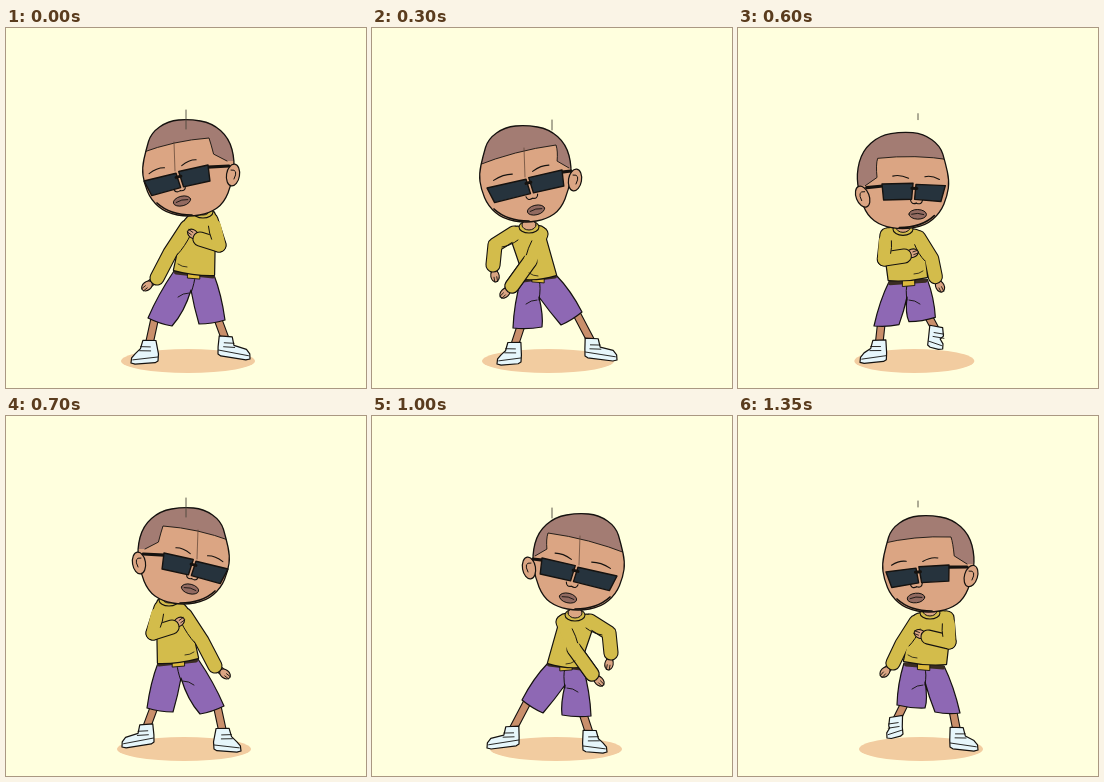
An HTML page with a canvas for the animation above (1400 ms loop, 360 by 360 pixels).

```html
<!DOCTYPE html>
<html lang="en">
<head>
<meta charset="utf-8">
<title>Dancing kid</title>
<style>
html, body { margin: 0; width: 100%; height: 100%; overflow: hidden; background: #ffffde; }
canvas { display: block; width: 360px; height: 360px; }
</style>
</head>
<body>
<canvas id="stage"></canvas>
<script>
const LOOP = 1400, SWING = 700;
const STEPS = [0, 100, 200, 250, 300, 400, 500, 550, 600, 650, 700, 800, 850, 900, 1000, 1050, 1100, 1200, 1300, 1350];
const INK = '#15120f', SKIN = '#dba583', HAIR = '#a37c73', SHIRT = '#d3bc4b', SHORTS = '#8e68b4', SHOE = '#e6f6fb', LENS = '#26333d';

// One swing, facing left; the next swing is its mirror image.
// hair: front, corner, temple. specs: left, bridge, right. arms: elbow, wrist, hand.
// torso: collar, shoulders, hem. shorts: waist, left hem, crotch, right hem. feet: ankle, heel, toe.
const POSES = [
  { at: 0, head: [213, 166], hair: [177, 147, 239, 157, 243, 180], ear: [245, 193],
    specs: [172, 165, 199, 172, 230, 181], mouth: [188, 200], tick: [103, 111], crease: [0], shadow: [185, 55],
    torso: [203, 214, 184, 216, 219, 217, 179, 262, 219, 260],
    armL: [179, 240, 187, 260, 192, 268], armR: [229, 244, 214, 248, 206, 247],
    shorts: [178, 264, 216, 262, 165, 293, 186, 301, 199, 279, 202, 303, 228, 302],
    footL: [168, 303, 177, 323, 163, 327], footR: [218, 315, 210, 334, 227, 337] },
  { at: 100, head: [205, 162], hair: [163, 138, 235, 149, 240, 177], ear: [240, 186],
    specs: [162, 161, 191, 165, 226, 170], mouth: [185, 195], tick: [87, 93], crease: [0], shadow: [185, 56],
    torso: [201, 210, 181, 213, 216, 213, 181, 257, 212, 260],
    armL: [171, 236, 178, 252, 180, 263], armR: [219, 241, 201, 242, 193, 240],
    shorts: [180, 260, 215, 261, 170, 290, 193, 297, 199, 275, 203, 298, 228, 300],
    footL: [169, 296, 181, 315, 168, 319], footR: [219, 315, 211, 333, 234, 335] },
  { at: 250, head: [191, 148], hair: [148, 126, 213, 121, 229, 148], ear: [233, 160],
    specs: [148, 156, 179, 152, 211, 149], mouth: [178, 182], tick: [85, 91], crease: [0], shadow: [183, 62],
    torso: [192, 197, 177, 202, 210, 198, 166, 245, 208, 248],
    armL: [164, 228, 155, 247, 147, 256], armR: [211, 226, 190, 221, 182, 218],
    shorts: [166, 247, 206, 250, 159, 289, 187, 292, 187, 266, 197, 296, 222, 297],
    footL: [158, 302, 165, 318, 149, 322], footR: [219, 313, 212, 331, 240, 334] },
  { at: 300, head: [183, 140], hair: [141, 123, 203, 110, 221, 133], ear: [227, 147],
    specs: [138, 153, 171, 145, 202, 137], mouth: [176, 173], tick: [82, 101], crease: [29], shadow: [182, 67],
    torso: [197, 184, 180, 195, 206, 188, 168, 242, 208, 247],
    armL: [164, 225, 151, 250, 141, 258], armR: [213, 217, 194, 211, 187, 206],
    shorts: [168, 243, 208, 247, 142, 290, 166, 298, 185, 262, 193, 296, 219, 292],
    footL: [143, 314, 152, 333, 125, 335], footR: [220, 310, 212, 326, 244, 331] },
  { at: 500, head: [171, 143], hair: [128, 126, 197, 111, 212, 134], ear: [216, 146],
    specs: [130, 155, 164, 147, 199, 137], mouth: [172, 177], tick: [82, 89], crease: [0], shadow: [181, 66],
    torso: [180, 191, 168, 200, 199, 190, 161, 243, 202, 248],
    armL: [149, 225, 142, 249, 140, 258], armR: [204, 218, 179, 224, 168, 226],
    shorts: [163, 245, 203, 248, 146, 290, 170, 299, 184, 264, 191, 296, 216, 294],
    footL: [141, 315, 149, 333, 125, 336], footR: [220, 312, 213, 327, 246, 331] },
  { at: 600, head: [154, 146], hair: [110, 136, 184, 117, 197, 140], ear: [203, 152],
    specs: [115, 160, 155, 151, 190, 142], mouth: [164, 182], tick: [92, 102], crease: [29], shadow: [176, 66],
    torso: [157, 199, 141, 201, 170, 202, 153, 251, 184, 247],
    armL: [123, 217, 121, 237, 123, 248], armR: [158, 233, 140, 258, 133, 265],
    shorts: [149, 251, 184, 247, 141, 300, 170, 299, 167, 269, 189, 297, 210, 284],
    footL: [142, 316, 149, 334, 125, 336], footR: [220, 312, 213, 328, 245, 332] },
];

// The swing ends by sinking toward the floor.
const sink = (list) => list.map((v, i) => i % 2 ? v + 9 * Math.max(0, 320 - v) / 180 : v - 2);
const last = POSES[POSES.length - 1];
const low = { at: SWING, tick: [98, 106], crease: [0], shadow: [175, 60] };
for (const key in last) if (!(key in low)) low[key] = sink(last[key]);
POSES.push(low);

const mix = (a, b, k) => a + (b - a) * k;
function poseAt(u) {
  const i = POSES.findIndex((p) => p.at > u);
  const a = POSES[i - 1], b = POSES[i], k = (u - a.at) / (b.at - a.at), out = {};
  for (const key in a) if (key !== 'at') out[key] = a[key].map((v, j) => mix(v, b[key][j], k));
  return out;
}

const canvas = document.getElementById('stage');
const g = canvas.getContext('2d');
const ratio = window.devicePixelRatio || 1;
canvas.width = canvas.height = 360 * ratio;

const pts = (list) => list.reduce((r, v, i) => (i % 2 ? r[r.length - 1].push(v) : r.push([v]), r), []);
const off = (p, x, y) => [p[0] + x, p[1] + y];
const mid = (a, b, k = 0.5) => [mix(a[0], b[0], k), mix(a[1], b[1], k)];

function poly(p, closed = true) {
  const path = new Path2D();
  p.forEach((q, i) => i ? path.lineTo(...q) : path.moveTo(...q));
  if (closed) path.closePath();
  return path;
}
function blob(p) {
  const path = new Path2D(), n = p.length;
  path.moveTo(...mid(p[n - 1], p[0]));
  p.forEach((q, i) => path.quadraticCurveTo(...q, ...mid(q, p[(i + 1) % n])));
  path.closePath();
  return path;
}
function oval(c, rx, ry, turn = 0) {
  const path = new Path2D();
  path.ellipse(...c, rx, ry, turn, 0, 7);
  return path;
}
function curve(a, c, b) {
  const path = new Path2D();
  path.moveTo(...a);
  path.quadraticCurveTo(...c, ...b);
  return path;
}
function fill(path, color) { g.fillStyle = color; g.fill(path); }
function line(path, w = 1.2, color = INK) { g.lineWidth = w; g.strokeStyle = color; g.stroke(path); }
function shape(path, color, w = 1.2) { fill(path, color); line(path, w); }
function tube(path, w, color) { line(path, w + 2.2); line(path, w, color); }

function drawShoe(list) {
  const [a, heel, toe] = pts(list);
  const dx = toe[0] - heel[0], dy = toe[1] - heel[1], len = Math.hypot(dx, dy);
  const s = Math.sign(dx), kx = dx / len, ky = dy / len;
  const at = (p, x, y) => off(p, kx * x + ky * y * s, ky * x - kx * y * s);
  const back = at(a, -7, 1), front = at(a, 6, 2);
  shape(poly([back, at(heel, -1, 7), heel, at(heel, 3, -1.5), at(toe, -4, -1.5), toe, at(toe, -1, 5),
    at(toe, -5, 9), at(front, 3, -8), front]), SHOE, 1.2);
  line(poly([at(heel, 0, 4), at(toe, -2, 3)], false), 0.9);
  for (const d of [5, 9]) line(poly([at(a, -1, -d), at(a, 7 + d / 3, -d + 1)], false), 0.9);
}

function drawHand(wrist, hand) {
  const turn = Math.atan2(hand[1] - wrist[1], hand[0] - wrist[0]);
  line(poly([wrist, hand], false), 7.4);
  line(poly([wrist, hand], false), 5.4, SKIN);
  shape(oval(hand, 6, 4.2, turn), SKIN, 1.1);
  const c = Math.cos(turn), s = Math.sin(turn);
  for (const d of [-1.6, 1.2]) line(poly([off(hand, c - s * d, s + c * d), off(hand, 6 * c - s * d, 6 * s + c * d)], false), 0.9);
}

function drawLegs(p) {
  const [w1, w2, l1, l2, crotch, r1, r2] = pts(p.shorts);
  for (const [a, b, foot] of [[l1, l2, p.footL], [r2, r1, p.footR]]) {
    tube(poly([off(mid(a, b, 0.3), 0, -4), off(foot, 0, 3)], false), 6.5, '#c98f6b');
    drawShoe(foot);
  }
  const path = new Path2D();
  path.moveTo(...w1);
  path.quadraticCurveTo(...off(mid(w1, l1), -3, 0), ...l1);
  path.quadraticCurveTo(...off(mid(l1, l2), 0, 2), ...l2);
  path.quadraticCurveTo(...off(mid(l2, crotch), 3, 4), ...crotch);
  path.quadraticCurveTo(...off(mid(crotch, r1), -1, 0), ...r1);
  path.quadraticCurveTo(...off(mid(r1, r2), 0, 2), ...r2);
  path.quadraticCurveTo(...off(mid(r2, w2), 2, -3), ...w2);
  path.closePath();
  shape(path, SHORTS);
  const fly = mid(w1, w2, 0.52);
  line(curve(off(fly, 0, 4), off(mid(fly, crotch), 2, 0), off(crotch, 0, 3)), 1);
  line(curve(off(crotch, -2, 3), off(crotch, -8, 3), off(crotch, -13, 7)), 0.9);
  line(poly([off(w1, 2, 1.5), off(w2, -1, 1.5)], false), 4, '#3a2c22');
  const buckle = off(fly, -1, 2);
  shape(poly([off(buckle, -6, -3), off(buckle, 6, -2), off(buckle, 6, 4), off(buckle, -6, 3)]), '#dcb93c', 0.9);
}

function drawTop(p) {
  const [collar, s1, s2, h1, h2] = pts(p.torso);
  const [le, lw, lh] = pts(p.armL), [re, rw, rh] = pts(p.armR);
  const body = new Path2D();
  body.moveTo(...off(collar, -8, 0));
  body.quadraticCurveTo(...off(s1, -4, -4), ...off(s1, -3, 6));
  body.lineTo(...h1);
  body.quadraticCurveTo(...off(mid(h1, h2), 0, 3), ...h2);
  body.lineTo(...off(s2, 3, 6));
  body.quadraticCurveTo(...off(s2, 4, -5), ...off(collar, 8, -1));
  body.closePath();
  const left = poly([off(s1, 1, 4), le, lw], false);
  const right = poly([off(s2, -1, 4), re, rw], false);
  drawHand(lw, lh);
  line(body, 2.4);
  line(left, 15.2);
  line(right, 15.2);
  fill(body, SHIRT);
  line(left, 13, SHIRT);
  line(right, 13, SHIRT);
  line(curve(off(s1, 5, 11), mid(off(s1, 7, 14), off(le, 7, 3)), off(le, 7, 2)), 1);
  drawHand(rw, rh);
  tube(poly([re, rw], false), 13, SHIRT);
  line(poly([mid(s2, re, 0.35), re], false), 13, SHIRT);
  line(curve(off(mid(s2, re, 0.35), -6, 0), off(mid(s2, re, 0.6), -7, 0), off(mid(s2, re, 0.8), -6, 0)), 1);
  line(curve(off(h1, 4, -6), off(h1, 8, -3), off(h1, 13, -3)), 0.8);
  shape(oval(collar, 10, 6), SHIRT, 1.1);
  shape(oval(off(collar, 0, -2), 7, 5), SKIN, 1);
}

const SKULL = pts([-43, -18, -38, -35, -21, -47, 0, -49, 23, -45, 40, -30, 46, -7, 43, 15, 35, 35, 21, 45, 0, 49, -23, 45, -38, 32, -45, 15, -47, 0]);

function drawHead(p) {
  const c = p.head, [f, k, t] = pts(p.hair);
  const skull = blob(SKULL.map((q) => off(c, ...q)));
  fill(skull, SKIN);
  g.save();
  g.clip(skull);
  const edge = new Path2D();
  edge.moveTo(...off(f, -6, 2));
  edge.quadraticCurveTo(...off(mid(f, k), -4, -4), ...k);
  edge.quadraticCurveTo(...off(k, 2, 6), ...off(mid(k, t, 0.7), -8, 0));
  edge.lineTo(...t);
  const hair = new Path2D(edge);
  for (const q of [off(t, 40, 0), off(c, 90, -90), off(c, -90, -90), off(f, -40, 0)]) hair.lineTo(...q);
  fill(hair, HAIR);
  line(edge, 0.9);
  g.restore();
  line(skull, 1.3);
  line(curve(off(c, -32, 35), off(c, -19, 47), off(c, 3, 47)), 1.7);

  const [l, b, r] = pts(p.specs);
  const turn = Math.atan2(r[1] - l[1], r[0] - l[0]), cs = Math.cos(turn), sn = Math.sin(turn);
  const at = (q, x, y) => off(q, x * cs - y * sn, x * sn + y * cs);

  shape(oval(p.ear, 6.5, 11, turn + 0.4), SKIN, 1.2);
  line(curve(off(p.ear, -2, -5), off(p.ear, 6, -6), off(p.ear, 1, 4)), 1);

  if (p.crease[0] > 2) line(poly([off(b, -2, -2), off(b, -3, -2 - p.crease[0])], false), 0.7, '#5a4032');
  for (const [a, z] of [[l, b], [b, r]]) {
    const u = at(mid(a, z, 0.2), 0, -6), v = at(mid(a, z, 0.68), 0, -8);
    line(curve(u, at(mid(u, v), 1, -3), v), 1.1);
  }

  const m = p.mouth, nose = mid(b, m, 0.56);
  line(curve(at(nose, -6, -1), at(nose, -5, 4), at(nose, 0, 2)), 1.1);
  line(curve(at(nose, 0, 2), at(nose, 5, 4), at(nose, 6, -1)), 1.1);
  shape(oval(m, 8.8, 4.8, turn), '#926a60', 1);
  line(curve(at(m, -6, 0), at(m, 0, -2), at(m, 6, 0)), 0.9);

  line(poly([at(r, -1, 2), off(p.ear, -4, -9)], false), 3.2);
  shape(poly([l, at(b, -1, 0), at(b, 0, 15), at(l, 4, 16)]), LENS, 1.4);
  shape(poly([at(b, 2, -1), r, at(r, -2, 16), at(b, 3, 15)]), LENS, 1.4);
  line(poly([at(b, -2, 4), at(b, 3, 4)], false), 3);
}

function draw(now) {
  const time = now % LOOP;
  const step = STEPS.filter((s) => s <= time).pop();
  const u = (step + 300) % LOOP;
  const p = poseAt(u % SWING);
  g.setTransform(ratio, 0, 0, ratio, 0, 0);
  g.fillStyle = '#ffffde';
  g.fillRect(0, 0, 360, 360);
  if (u >= SWING) g.transform(-1, 0, 0, 1, 360, 0);
  g.lineCap = g.lineJoin = 'round';
  fill(oval([p.shadow[0], 333], p.shadow[1], 12), '#f2cca0');
  drawLegs(p);
  drawTop(p);
  drawHead(p);
  line(poly([[180, p.tick[0]], [180, p.tick[1]]], false), 0.9, '#4a463c');
}

function loop() {
  draw(performance.now());
  requestAnimationFrame(loop);
}
loop();
</script>
</body>
</html>
```
